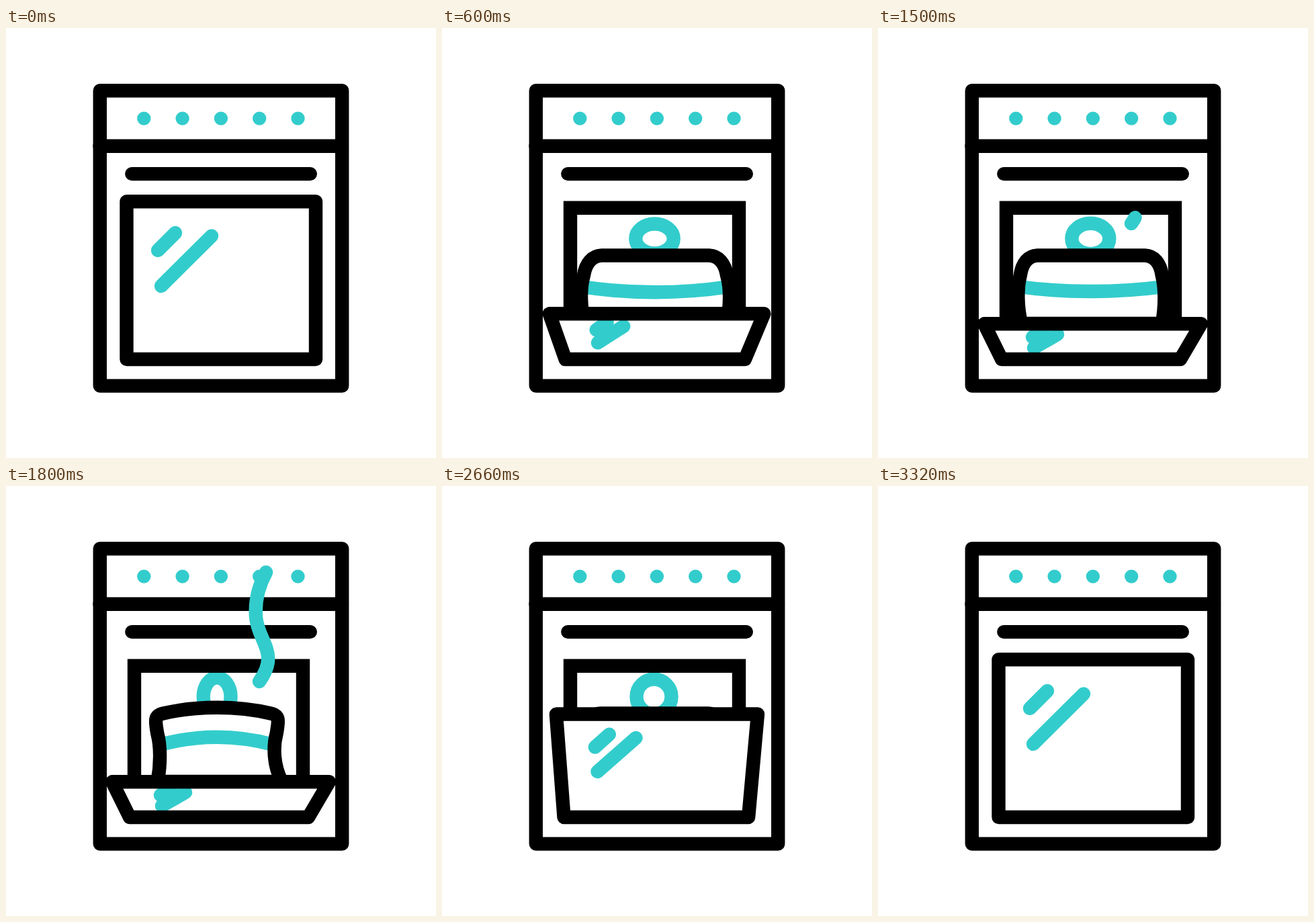
Recreate the animation shown at these times as an HTML page. Size 640 by 640 pixels, loop 3.5 s.

```html
<!DOCTYPE html>
<html lang="en">
<head>
<meta charset="utf-8">
<title>Oven</title>
<style>
  html, body { margin: 0; width: 100%; height: 100%; overflow: hidden; background: #fff; }
  svg { display: block; width: 100%; height: 100%; }
  .ink, .teal { fill: none; stroke-width: 20.4; stroke-linecap: round; stroke-linejoin: round; }
  .ink { stroke: #000; }
  .teal { stroke: #3cc; }
  .white { fill: #fff; }
  #band { stroke-linecap: butt; }
  #frame { stroke-linecap: butt; stroke-linejoin: miter; }
</style>
</head>
<body>
<svg viewBox="0 0 640 640">
  <rect class="ink" x="139.8" y="93.3" width="360.4" height="439.3"/>
  <path class="ink" d="M139.5 175.8H500M187.3 217.1H452.8"/>
  <path id="knobs" class="teal"/>

  <ellipse id="ring" class="teal"/>
  <path id="frame" class="ink" d="M191 485V267.7H442V485"/>
  <path id="cakeFill" class="white"/>
  <path id="band" class="teal"/>
  <path id="cake" class="ink"/>

  <path id="steamA" class="teal" pathLength="1" d="M258 313C272 295 274 262 266 240C258 216 238 200 243 168"/>
  <path id="steamB" class="teal" pathLength="1" d="M377 291C408 248 375 232 372 195C370 168 378 142 392 120"/>

  <path id="doorFill" class="white"/>
  <path id="glare" class="teal"/>
  <path id="door" class="ink"/>
</svg>
<script>
const LOOP = 3500;
const set = (id, attrs) => {
  const node = document.getElementById(id);
  for (const k in attrs) node.setAttribute(k, attrs[k]);
};
const ease = (t, from, to) => {
  const x = Math.min(1, Math.max(0, (t - from) / (to - from)));
  return x * x * (3 - 2 * x);
};

// Time and amount: 1 is fully squashed, negative is stretched.
const wobble = [[180, 0], [600, 1], [1020, -1.5], [1440, 1], [1860, -1.5], [2220, 0]];

function squashAt(t) {
  let k = 0;
  wobble.slice(1).forEach(([time, amount], i) => {
    const [prevTime, prevAmount] = wobble[i];
    k += (amount - prevAmount) * ease(t, prevTime, time);
  });
  return k;
}

function drawCake(t) {
  const k = squashAt(t);
  const bow = Math.min(0, k);
  const cx = 316 + 1.5 * k;

  // One wall from foot to top edge; side is -1 for left, 1 for right.
  const wall = side => {
    const at = (half, y) => `${cx + side * half} ${y}`;
    const belly = 100 + 12 * k;
    return [
      `${318 + side * (100 + 5.5 * k)} 440`,
      at(belly, 415), at(belly, 387), at(99 + 7.5 * k, 368),
      at(98.5 + 5 * k, 350), at(94, 339 - 2 * bow), at(80, 338.5)
    ];
  };
  const [foot, ...up] = wall(-1);
  const down = wall(1).reverse();
  const topY = 338.5 + 8.5 * bow;
  const d = `M${foot}C${up}C${cx - 30} ${topY} ${cx + 30} ${topY} ${down}Z`;
  set("cakeFill", { d });
  set("cake", { d });

  const reach = 99 + 11 * k;
  set("band", { d: `M${cx - reach} 385Q${cx} ${385 + 16.5 * k} ${cx + reach} 385` });
  set("ring", { cx: 315.5 + k, cy: 313.5, rx: 26 + 3 * k - 0.8 * k * k, ry: 26 - 3 * k - k * k });
}

function drawDoor(t) {
  const p = ease(t, 140, 700) - ease(t, 2361, 2921);
  const at = (x, y, dx, dy) => `${x + dx * p} ${y + dy * p}`;
  const d = `M${at(179.5, 258.3, -21.5, 182)}L${at(461, 258.3, 20, 182)}` +
    `L${at(461, 493, -11, 0)}L${at(179.5, 493, 4.5, 0)}Z`;
  set("doorFill", { d });
  set("door", { d });
  set("glare", {
    d: `M${at(226, 331, 4, 129)}L${at(252, 305, -7, 145)}` +
      `M${at(231, 384, 1, 92)}L${at(306, 309.5, -39, 146.5)}`
  });
}

function drawSteam(id, t, start, full, end) {
  const tip = ease(t, start, full), tail = ease(t, full, end);
  set(id, {
    visibility: t > start && t < end ? "visible" : "hidden",
    "stroke-dasharray": `${tip - tail} 3`,
    "stroke-dashoffset": -tail
  });
}

function draw(t) {
  drawCake(t);
  drawSteam("steamA", t, 620, 1020, 1440);
  drawSteam("steamB", t, 1440, 1860, 2300);
  drawDoor(t);
}

const knobs = Array.from({ length: 5 }, (_, i) => `M${205.3 + 57.3 * i} 134.6h0`);
set("knobs", { d: knobs.join("") });

const t0 = performance.now();
function tick() {
  draw((performance.now() - t0) % LOOP);
  requestAnimationFrame(tick);
}
tick();
</script>
</body>
</html>
```
